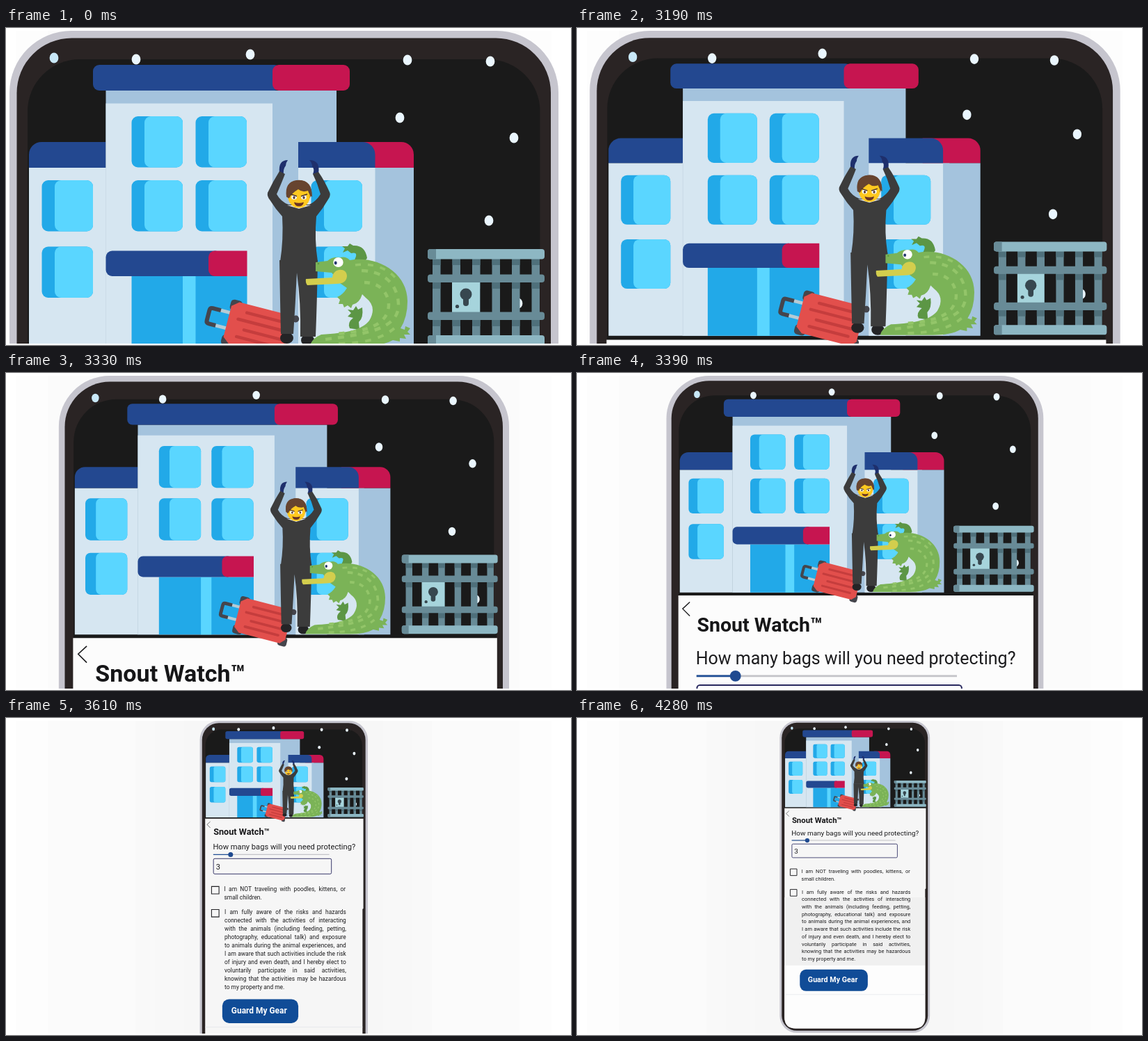
An HTML page with a canvas that plays this animation: 812x456 px, repeating every 9.71 s.

```html
<!DOCTYPE html>
<html lang="en">
<head>
<meta charset="utf-8">
<title>Luggage guard app</title>
<style>
html, body { margin: 0; width: 812px; height: 456px; overflow: hidden; background: #fff; }
canvas { display: block; }
</style>
</head>
<body>
<canvas id="stage" width="812" height="456"></canvas>
<script>
const ctx = document.getElementById('stage').getContext('2d');
const LOOP = 9710, END_SCALE = 0.2735, PIVOT = { x: 399.2, y: 4 };

// Zoom progress: time, value, slope per ms
const ZOOM = [
  [3050, 0, 0], [3270, 0.131, 0.00142], [3390, 0.4275, 0.0037],
  [3610, 0.9546, 0.00068], [3800, 0.998, 0.00003], [3950, 1, 0]
];

const NAVY = '#234890', RED = '#c61550', WALL = '#d6e6f1', SHADE = '#a4c3dd';
const GLASS = '#5ad6ff', GLASS_DARK = '#22a9e8', NIGHT = '#1a1a1a', SUIT = '#3c3c3c';

const TERMS = [
  'I am fully aware of the risks and hazards',
  'connected with the activities of interacting',
  'with the animals (including feeding, petting,',
  'photography, educational talk) and exposure',
  'to animals during the animal experiences, and',
  'I am aware that such activities include the risk',
  'of injury and even death, and I hereby elect to',
  'voluntarily participate in said activities,',
  'knowing that the activities may be hazardous',
  'to my property and me.'
];

function zoomAt(t) {
  if (t <= ZOOM[0][0]) return 0;
  const i = ZOOM.findIndex(k => k[0] > t);
  if (i < 0) return 1;
  const [t0, a, m] = ZOOM[i - 1], [t1, b, n] = ZOOM[i];
  const h = t1 - t0, u = (t - t0) / h, v = 1 - u;
  return v * v * (1 + 2 * u) * a + u * u * (1 + 2 * v) * b + h * u * v * (v * m - u * n);
}

function box(x0, y0, x1, y1, color, radius = 0) {
  ctx.fillStyle = color;
  ctx.beginPath();
  ctx.roundRect(x0, y0, x1 - x0, y1 - y0, radius);
  ctx.fill();
}

function oval(x, y, rx, ry, color) {
  ctx.fillStyle = color;
  ctx.beginPath();
  ctx.ellipse(x, y, rx, ry, 0, 0, Math.PI * 2);
  ctx.fill();
}

function shape(d, color) {
  ctx.fillStyle = color;
  ctx.fill(new Path2D(d));
}

function line(d, color, width, dash = []) {
  ctx.strokeStyle = color;
  ctx.lineWidth = width;
  ctx.setLineDash(dash);
  ctx.stroke(new Path2D(d));
  ctx.setLineDash([]);
}

function text(str, x, y, size, color = '#1c1c1e', weight = 400) {
  ctx.font = `${weight} ${size}px Roboto, sans-serif`;
  ctx.fillStyle = color;
  ctx.fillText(str, x, y);
}

// A condensed face, where there is one, is set larger for the same line length
function setBodyFont(size) {
  const sample = TERMS[0];
  ctx.font = `400 ${size}px Roboto, sans-serif`;
  const normal = ctx.measureText(sample).width;
  ctx.font = `400 condensed ${size}px Roboto, sans-serif`;
  const ratio = normal / ctx.measureText(sample).width;
  ctx.font = `400 condensed ${size * ratio}px Roboto, sans-serif`;
}

function paragraph(lines, x, y, width, pitch) {
  setBodyFont(27.4);
  ctx.fillStyle = '#1c1c1e';
  lines.forEach((str, i) => {
    const words = str.split(' ');
    const last = i === lines.length - 1;
    const used = words.reduce((sum, w) => sum + ctx.measureText(w).width, 0);
    const gap = last ? ctx.measureText(' ').width : (width - used) / (words.length - 1);
    let left = x;
    for (const word of words) {
      ctx.fillText(word, left, y + i * pitch);
      left += ctx.measureText(word).width + gap;
    }
  });
}

function backdrop() {
  box(0, 0, 812, 456, '#fff');
  const bands = [[14, '#fdfdfd'], [60, '#fbfbfb'], [186, '#f9f9f9'], [214, '#f8f8f8'], [256, '#f7f7f7']];
  for (const [x, color] of bands) box(x, 4, 798 - x, 454, color);
}

function phone() {
  box(5, 4, 794, 1645, '#c6c5ce', 89);
  box(15.5, 14.5, 783, 1634, '#2a2424', 79);
  box(31, 45, 767.5, 466, NIGHT, [75, 75, 0, 0]);
  box(31, 456, 772, 470, NIGHT);
}

function stars() {
  const spots = [[69, 43], [187, 45], [351, 38], [577, 46], [696, 48],
    [566, 129], [730, 158], [694, 277], [736, 396]];
  spots.forEach(([x, y], i) => oval(x, y, 6.4, 7.6, i ? '#eaf6fe' : '#c8e8f8'));
}

function pane(x, y) {
  box(x, y, x + 73.5, y + 73.5, GLASS_DARK, 9);
  box(x + 18.5, y, x + 73.5, y + 73.5, GLASS, 9);
}

function building() {
  box(33, 201, 143.5, 458, WALL);
  box(33, 164, 143.5, 201, NAVY, [18, 0, 0, 0]);
  box(143.5, 90, 475, 458, SHADE);
  box(143.5, 108.5, 383, 458, WALL);
  box(143, 201, 144, 458, '#cbdce8');
  box(420, 201, 540, 458, WALL);
  box(530.5, 201, 586, 458, SHADE);
  box(500, 164, 586, 201, RED, [0, 18, 0, 0]);
  box(420, 164, 530.5, 201, NAVY, [0, 18, 0, 0]);
  box(125, 53, 395, 90, NAVY, 9);
  box(383, 53, 494, 90, RED, 9);

  for (const y of [127, 219]) for (const x of [180.5, 272.5]) pane(x, y);
  for (const y of [219, 314.5]) for (const x of [51.5, 438.5]) pane(x, y);

  box(180.5, 357, 346.5, 458, GLASS_DARK);
  box(254, 357, 272.5, 458, GLASS);
  box(143.5, 320.5, 310, 357, NAVY, 9);
  box(291, 320.5, 346.5, 357, RED, [9, 0, 0, 9]);
}

function cage() {
  const bar = '#688b97', shadow = '#4f707b', light = '#8db7c3';
  for (let i = 0; i < 6; i++) {
    const x = 613 + i * 28.5;
    box(x, 325, x + 11.5, 450, bar);
    for (const y of [332, 366, 420]) box(x, y, x + 11.5, y + 9, shadow);
  }
  box(641, 365, 681, 409, '#a6d4dc');
  oval(661, 383, 8.5, 8.5, '#37474f');
  box(657, 385, 665, 400, '#37474f', 4);
  oval(648.5, 400.5, 2.6, 2.6, '#37474f');
  for (const y of [354.5, 408.5]) box(606, y, 774, y + 11.5, bar, 4);
  for (const y of [318, 442]) {
    box(606, y, 774, y + 14.5, light, 4);
    box(606, y, 618, y + 14.5, bar, [4, 0, 0, 4]);
  }
}

function form(t) {
  shape('M30 464H773V886L769 890V1564Q769 1622 711 1622H88Q30 1622 30 1564Z',
    t < 3500 ? '#fcfcfc' : '#f6f6f6');
  if (t >= 4280) {
    box(30, 933, 769, 1291, '#f0f0f0');
    box(30, 1291, 769, 1622, '#fdfdfd', [0, 0, 58, 58]);
  }
  line('M30 1444H769', '#e6e8ec', 3);
  line('M54 478L39 492L54 507', '#1c1c1e', 2);

  text('Snout Watch™', 69, 540, 41.5, '#161618', 700);
  text('How many bags will you need protecting?', 66.5, 609, 36.4);
  line('M68 633H613', '#c3c3c8', 4);
  line('M68 633H150', '#1f4e96', 4);
  oval(149.5, 633, 11.5, 11.5, '#1f4a90');

  ctx.strokeStyle = '#28285e';
  ctx.lineWidth = 3;
  ctx.beginPath();
  ctx.roundRect(69, 652, 554, 72, 6);
  ctx.stroke();
  text('3', 81, 704, 36);

  for (const y of [783, 891]) line(`M60 ${y}H95V${y + 35}H60Z`, '#202024', 3.5);
  paragraph(['I am NOT traveling with poodles, kittens, or', 'small children.'],
    119, 804, 571, 39.2);
  paragraph(TERMS, 121, 913, 571, 39.2);

  box(110.5, 1312.5, 467.5, 1425.5, '#104c97', 32);
  text('Guard My Gear', 153, 1380, 39, '#fff', 700);
}

function suitcase() {
  const dark = '#45454c';
  ctx.save();
  ctx.translate(326, 392);
  ctx.rotate(0.253);
  line('M-22 18H2M-22 41H2', '#b5cbd5', 5);
  line('M-13 18H-25Q-29 18 -29 22V37Q-29 41 -25 41H-15', dark, 6);
  box(-2, -2, 15, 14, dark, 5);
  box(-2, 50, 15, 65, dark, 5);
  box(80, 50, 96, 66, dark, 5);
  oval(94, 3, 5, 5, dark);
  shape('M10 0H84Q92 0 92 8V54L84 62H10L0 54V8Z', '#e24f4c');
  ctx.lineCap = 'round';
  line('M24 12H78M14 24H80M26 37H82M18 49H78', '#c53d3d', 4.5);
  ctx.restore();
}

function man() {
  const hand = '#1e2f6c', skin = '#ffc81f', hair = '#67442f';
  shape('M393 208Q391 190 405 190Q402 194 402 198Q398 203 399 211Z', hand);
  shape('M449 209Q452 190 436 190Q440 194 440 199Q444 203 441 210Z', hand);
  oval(403.5, 446, 9.5, 8, '#242426');
  oval(433.5, 449, 9.5, 8, '#242426');
  shape('M393 334H448Q447 395 445 444H423Q424 395 418 352Q416 395 413 440H395Q394 395 393 334Z', SUIT);
  shape('M393 206Q384 220 376 237Q375 242 379 247Q387 260 397 271Q399 304 394 336' +
    'H448Q443 304 446 271Q456 259 464 245Q467 240 465 236Q458 220 449 207L441 210' +
    'Q448 224 452 239Q446 249 436 254H406Q395 250 389 239Q396 223 401 210Z', SUIT);
  shape('M404 255H438L421 260Z', '#e4e7ec');
  oval(421, 236, 18, 17, hair);
  oval(421, 242, 15.8, 16.8, skin);
  shape('M403 243Q400 221 418 219Q440 217 440 243Q436 241 434 234Q426 237 420 232Q410 238 407 245Z', hair);
  for (const x of [414, 428]) {
    oval(x, 243.5, 3.8, 3.2, '#fff');
    oval(x, 244, 1.7, 1.9, '#5d4037');
  }
  line('M409 239L418 242M433 239L424 242', '#4c3224', 1.5);
  shape('M414 250.5Q421 253 428 250.5Q427 256.5 421 256.5Q415 256.5 414 250.5Z', '#6b3524');
}

function gator() {
  const green = '#7bb357', dark = '#5c9645', pale = '#93c569';
  shape('M500 335Q508 321 496 324L491 320L484 323L487 317L483 314L491 314L494 310L499 313' +
    'Q516 312 519 331L513 339Z', dark);
  shape('M494 432Q490 424 499 417L491 415L496 410L491 405L499 406L503 400L506 405L512 402' +
    'Q514 417 507 423L508 434Z', dark);
  shape('M445 337L462 335Q468 329 480 330Q489 328 494 334C534 327 577 352 577 393' +
    'Q577 416 567 432L573 434L574 429L581 432L577 437L581 441L572 441L575 447L566 446L566 451L556 449' +
    'Q542 457 515 457H437Q439 447 453 441C490 439 512 434 522 421' +
    'Q534 401 517 388L512 383Q508 396 498 398L496 403L491 399L486 402L484 397L478 397L480 391L476 387' +
    'Q484 384 490 374L480 367L468 352L445 350Z', green);
  line('M511 349C548 350 563 373 564 397C565 427 535 439 458 448', pale, 4.5, [9, 9]);
  line('M515 366C538 366 550 382 550 399C549 423 527 437 470 440', pale, 4.5, [8, 9]);
  line('M502 341C526 338 547 344 561 361', pale, 3.5, [8, 10]);
  line('M478 454Q532 454 558 432', pale, 4, [9, 10]);
  shape('M431 361L469 359C470 345 490 344 490 357Q489 368 475 368L433 370Q430 366 431 361Z', '#d3ce4d');
  oval(477.5, 337, 7.2, 7, '#fff');
  oval(473.7, 338, 2, 2.4, '#24366d');
  oval(449, 339, 1.3, 1.3, dark);
}

function render(t) {
  const scale = 1 - (1 - END_SCALE) * zoomAt(t);
  ctx.setTransform(1, 0, 0, 1, 0, 0);
  backdrop();
  ctx.save();
  ctx.beginPath();
  ctx.rect(4, 4, 790, 450);
  ctx.clip();
  ctx.translate(PIVOT.x * (1 - scale), PIVOT.y * (1 - scale));
  ctx.scale(scale, scale);
  phone();
  stars();
  building();
  cage();
  form(t);
  suitcase();
  man();
  gator();
  ctx.restore();
}

const start = performance.now();
function tick() {
  render((performance.now() - start) % LOOP);
  requestAnimationFrame(tick);
}
tick();
</script>
</body>
</html>
```
